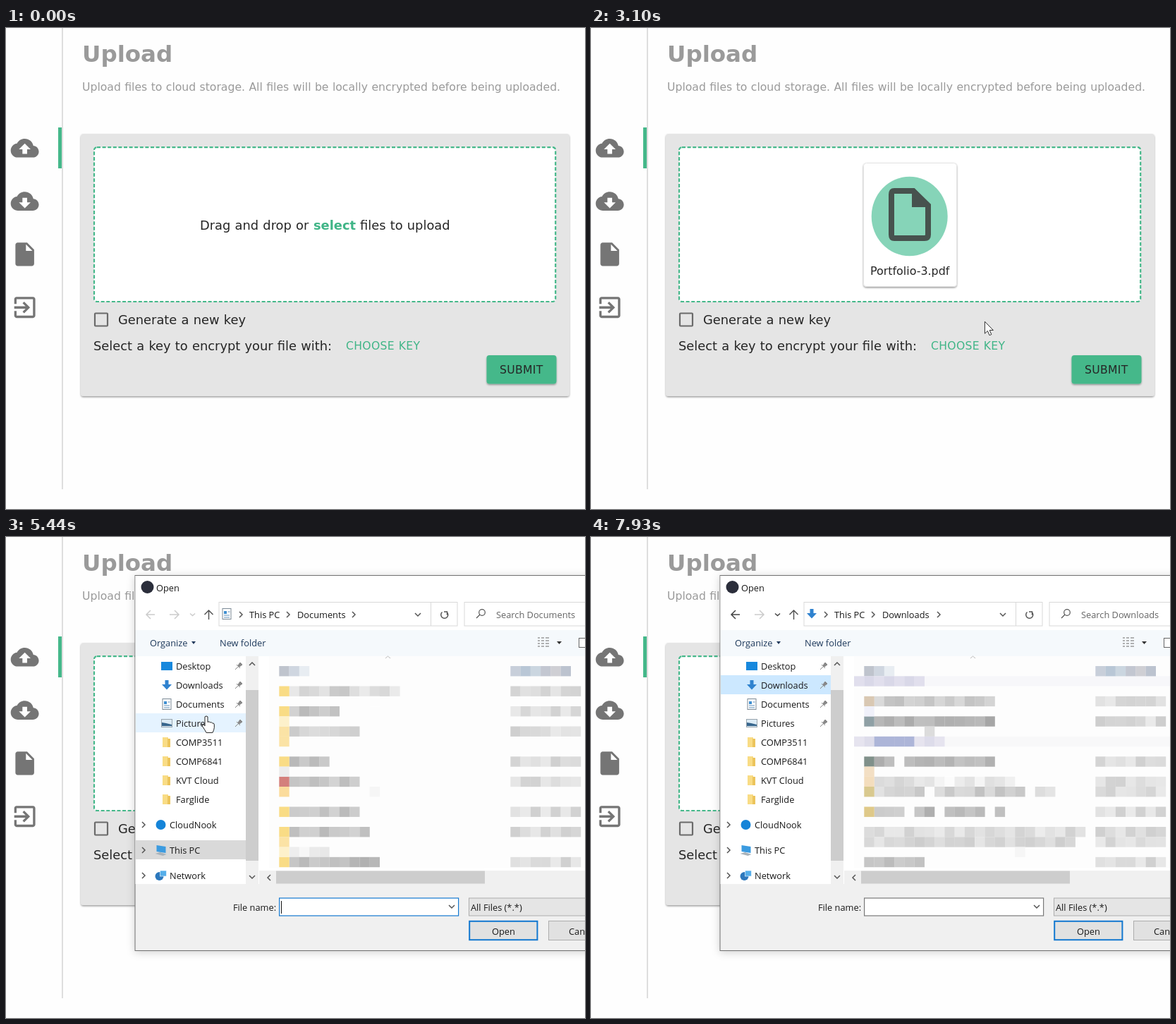
Write an HTML page that moves like this. It is 821 by 682 pixels and loops after 8 s.

```html
<!DOCTYPE html>
<html lang="en">
<head>
<meta charset="utf-8">
<title>Encrypted upload</title>
<style>
html, body { margin: 0; width: 100%; height: 100%; overflow: hidden; background: #fefefe; }
svg { display: block; }
text { white-space: pre; }
.page text { font-family: "DejaVu Sans", sans-serif; font-size: 17.85px; fill: #262626; word-spacing: .03em; }
.dialog text, .drag text { font-family: "Open Sans", sans-serif; font-size: 12.8px; fill: #1a1a1a; }
.page .muted { fill: #9a9a9a; }
.page .green { fill: #40b587; }
.page .button { font-size: 15.6px; letter-spacing: .35px; }
.dialog .soft { fill: #666; }
.dialog .tool { fill: #1e395b; }
.line { fill: none; stroke: #555; stroke-width: 1.5; }
</style>
</head>
<body>
<svg id="stage" width="821" height="682" viewBox="0 0 821 682"></svg>
<script>
const LOOP = 8000;
const GREEN = '#45b88a';
const CELL = 14.26;
const stage = document.getElementById('stage');

const text = (x, y, s, attrs = '') => `<text x="${x}" y="${y}" ${attrs}>${s}</text>`;
const rect = (x, y, w, h, fill, attrs = '') =>
  `<rect x="${x}" y="${y}" width="${w}" height="${h}" fill="${fill}" ${attrs}/>`;
const path = (d, attrs = 'class="line"') => `<path d="${d}" ${attrs}/>`;
const disc = (x, y, r, fill) => `<circle cx="${x}" cy="${y}" r="${r}" fill="${fill}"/>`;
const group = (id, body, attrs = '') => `<g id="${id}" ${attrs}>${body}</g>`;
const chevron = (x, y) => path(`M${x - 2} ${y - 4}l4 4-4 4`);
const downChevron = (x, y) => path(`M${x - 4} ${y - 2}l4 4 4-4`);
const noise = n => { const v = Math.sin(n * 127.1 + 31.7) * 43758.5453; return v - Math.floor(v); };

/* Page */
const CLOUD = 'M19.35 10.04C18.67 6.59 15.64 4 12 4 9.11 4 6.6 5.64 5.35 8.04 2.34 8.36 0 10.91 0 14c0 3.31 2.69 6 6 6h13c2.76 0 5-2.24 5-5 0-2.64-2.05-4.78-4.65-4.96z';
const navIcons = [
  CLOUD + 'M14 13v4h-4v-4H7l5-5 5 5h-3z',
  CLOUD + 'M17 13l-5 5-5-5h3V9h4v4h3z',
  'M6 2c-1.1 0-1.99.9-1.99 2L4 20c0 1.1.89 2 1.99 2H18c1.1 0 2-.9 2-2V8l-6-6H6zm7 7V3.5L18.5 9H13z',
  'M10.09 15.59L11.5 17l5-5-5-5-1.41 1.41L12.67 11H3v2h9.67l-2.58 2.59zM19 3H5c-1.11 0-2 .9-2 2v4h2V5h14v14H5v-4H3v4c0 1.1.89 2 2 2h14c1.1 0 2-.9 2-2V5c0-1.1-.9-2-2-2z'
].map((d, i) => path(d, `transform="translate(6.7 ${150.4 + i * 75.3}) scale(1.66)" fill="#757575" fill-rule="evenodd"`)).join('');

const fileCard =
  rect(386.5, 191.5, 132, 175, '#fff', 'rx="4" stroke="#e4e4e4" filter="url(#lift)"') +
  '<ellipse cx="451.7" cy="267" rx="54" ry="56.3" fill="#86d4b8"/>' +
  path('M430 231H457L478 252V293Q478 298 473 298H430Q426 298 426 293V236Q426 231 430 231Z', 'fill="none" stroke="#47524e" stroke-width="8"') +
  path('M455 228H459L482 250V254H455Z', 'fill="#47524e"') +
  text(396, 350, 'Portfolio-3.pdf', 'style="font-size:15.9px"');

const page =
  rect(79, 0, 2, 654, '#dedede') + rect(74, 141, 5, 58, GREEN) + navIcons +
  text(108, 48, 'Upload', 'class="muted" style="font-size:32.5px;font-weight:bold"') +
  text(108, 89, 'Upload files to cloud storage. All files will be locally encrypted before being uploaded.',
    'class="muted" style="font-size:15.65px"') +
  rect(106, 150, 693, 372, '#e5e5e5', 'rx="4" filter="url(#lift)"') +
  group('zone',
    rect(125, 169.2, 654.2, 218.8, '#fff', `rx="4" stroke="${GREEN}" stroke-width="2.2" stroke-dasharray="5 2.6"`) +
    group('prompt',
      text(275, 286, 'Drag and drop or') +
      text(436, 286, 'select', 'class="green" font-weight="bold"') +
      text(502, 286, 'files to upload'))) +
  group('card', fileCard) +
  rect(126, 404.5, 18, 18, 'none', 'rx="1" stroke="#6b6b6b" stroke-width="2.2"') +
  text(159, 420, 'Generate a new key') +
  text(124, 457, 'Select a key to encrypt your file with:') +
  rect(474, 437, 120, 27, GREEN, 'id="keyHover" rx="4"') +
  text(482, 456, 'CHOOSE KEY', 'class="green button"') +
  rect(681.5, 464, 99, 40.5, GREEN, 'rx="4" filter="url(#lift)"') +
  text(700, 490, 'SUBMIT', 'class="button"');

/* File dialog */
const downArrow = (x, y) => path(`M${x - 2.5} ${y - 7}h5v6h4.5l-7 7.5-7-7.5h4.5z`, 'fill="#2f82cf"');
const sheet = (x, y) => rect(x - 6, y - 7.5, 12, 15, '#fff', 'stroke="#7c8a96"') +
  rect(x - 4, y - 4, 4, 4, '#3f8fd0') +
  path(`M${x + 1.5} ${y - 3}h3M${x - 4} ${y + 2}h8M${x - 4} ${y + 5}h8`, 'stroke="#5f8fb8"');
const folder = (x, y) => rect(x - 6, y - 7, 8, 14, '#f9dc85') + rect(x + 1, y - 5, 4, 12, '#ecc45c');
const screen = (x, y) => rect(x - 8, y - 6, 16, 12, '#1788dd');
const picture = (x, y) => rect(x - 7.5, y - 5.5, 15, 11, '#dcebf5', 'stroke="#98a4ad"') +
  path(`M${x - 7} ${y + 4}v-5l6 1 8 2v2z`, 'fill="#36658c"');
const computer = (x, y) => path(`M${x - 6} ${y - 7}l13 2v9l-13-2z`, 'fill="#3b9be0"') +
  path(`M${x - 8} ${y + 5}l7-2 9 3-5 2z`, 'fill="#a9b2b9"');
const network = (x, y) => disc(x - 2, y + 1, 6, '#2c78bd') + rect(x - 1, y - 7, 9, 8, '#55aeea', 'stroke="#fff" stroke-width=".6"');
const pin = y => path(`M325 ${y + 5}l4-4M327 ${y - 2}l5 5M329 ${y - 1}l3-4 3 3-4 3z`, 'fill="#888" stroke="#888"');

const places = [['Desktop', screen], ['Downloads', downArrow], ['Documents', sheet], ['Pictures', picture],
  ['COMP3511', folder], ['COMP6841', folder], ['KVT Cloud', folder], ['Farglide', folder]]
  .map(([name, icon], i) => {
    const y = 183 + i * 27;
    return icon(228, y) + text(241, y + 4.6, name) + (i < 4 ? pin(y) : '');
  }).join('');
const roots = [['CloudNook', (x, y) => disc(x, y, 7, '#1584d8')], ['This PC', computer], ['Network', network]]
  .map(([name, icon], i) => {
    const y = 408 + i * 36;
    return chevron(195, y) + icon(219.5, y) + text(232, y + 4.6, name);
  }).join('');

const folderNames = ['Custom Letter Templates', 'Downloads', 'Luminous Forge', 'Thornwick', 'zibbit', 'Corvell Vaults',
  'PenLeaf Notebooks', 'ProgramThings', 'Sound recordings', 'Website', 'ConsoleScriptTool'];
const folderDates = ['14/04/2020 11:37 PM', '19/01/2020 10:57 AM', '15/02/2020 9:49 PM', '20/04/2021 11:21 AM',
  '23/05/2020 7:05 PM', '6/06/2021 1:06 PM', '15/02/2020 10:40 PM', '24/05/2021 10:31 AM',
  '12/04/2021 10:10 AM', '15/02/2020 9:49 PM', '27/04/2021 9:57 AM'];
const fileList = text(383.5, 189, 'Name', 'class="soft"') + text(714.7, 189, 'Date modified', 'class="soft"') +
  rect(380, 448, 441, 23, '#e5f3ff') +
  folderNames.map((name, i) => {
    const y = 219 + i * 24;
    return (i === 5 ? rect(385, y - 7, 14, 14, '#a3562d') : folder(391, y)) +
      text(405, y + 4.6, name) + text(714.7, y + 4.6, folderDates[i], 'class="soft"');
  }).join('');

const cell = (col, row, fill) =>
  rect((387.3 + col * CELL).toFixed(1), (183 + row * 14.25).toFixed(1), 14.4, 14.4, fill);

// Each row: line, first column, end column, grey level, icon colour. Rows with an icon also get a date.
function mosaic(rows) {
  const run = (line, from, to, level) => {
    let out = '';
    for (let col = from; col < to; col++) {
      const v = Math.round(level + (noise(col + line * 37) - .5) * 28);
      out += cell(col, line, `rgb(${v},${v},${v})`);
    }
    return out;
  };
  const header = ['#bfc4cd', '#cfd6e0', '#e8edf2'].map((c, i) => cell(i, 0, c)).join('') +
    ['#c8cfda', '#b9c7d6', '#cbd6e0', '#c3c7d1', '#cfcfd4', '#bcc3cf'].map((c, i) => cell(23 + i, 0, c)).join('');
  return rect(373, 169, 448, 300, '#fdfdfd') + header + rows.map(([line, from, to, level, icon]) =>
    run(line, from, to, level) + (icon ? cell(0, line, icon) + run(line, 23, 30, 220) : '')).join('');
}
const YELLOW = '#f9dc85', CREAM = '#fbe3a5', PALE = '#fdf1cb';
const documents = mosaic([[2, 1, 5, 220, YELLOW], [2, 5, 7, 200], [2, 7, 12, 230], [4, 1, 6, 198, YELLOW],
  [6, 1, 8, 214, CREAM], [9, 1, 5, 198, YELLOW], [11, 1, 8, 200, '#d4807c'], [14, 1, 8, 200, YELLOW],
  [16, 1, 9, 198, YELLOW], [18, 1, 5, 238], [19, 1, 10, 190, YELLOW],
  [3, 9, 10, 242], [12, 9, 10, 236], [10, 0, 1, 238]]) +
  cell(0, 5, PALE) + cell(0, 7, CREAM) + cell(0, 12, '#fbdc9c') + cell(0, 17, CREAM) + cell(0, 18, PALE);
const lavender = (line, from, to, strong) => Array.from({ length: to - from }, (_, i) =>
  cell(from + i, line, strong && i > 1 && i < 6 ? '#adb5d8' : i % 2 ? '#dddcea' : '#e6e4ef')).join('');
const downloads = mosaic([[3, 1, 13, 205, '#d9c8b3'], [5, 1, 13, 180, '#8fa0a5'], [6, 6, 7, 224],
  [9, 1, 3, 186, '#80908a'], [9, 4, 13, 186], [11, 1, 6, 222, '#f3ddbd'], [11, 6, 15, 238],
  [12, 1, 6, 212, '#d9c98f'], [12, 7, 16, 208], [12, 17, 19, 222],
  [14, 1, 4, 200, '#dfc989'], [14, 5, 7, 188], [14, 8, 12, 194], [14, 13, 14, 204],
  [16, 1, 22, 222, '#dcdcdc'], [17, 1, 21, 218, '#d8d8d8'], [18, 15, 16, 234], [19, 1, 6, 192, '#c6c6c6']]) +
  cell(0, 4, '#f0f1fa') + cell(0, 10, '#f3dfc4') +
  rect(373, 283, 448, 14.25, '#f8f8f9') + lavender(7, -1, 8, true) + lavender(1, -1, 6, false);

const navArrows = path('M211 110H199m6-6-6 6 6 6', 'id="back" class="line"') +
  path('M232 110h13m-6-6 6 6-6 6', 'class="line" style="stroke:#ccc"') +
  path('M261 108.500l3.500 3 3.500-3', 'id="recent" class="line"') +
  path('M287.500 117v-13m-6 6 6-6 6 6');
const detailLines = [143, 147, 151, 155].map(y => path(`M754 ${y}h3m2 0h4m2 0h5`, 'stroke="#999" stroke-width="1.5"')).join('');

const dialog =
  rect(183, 54.5, 668, 532, '#f0f0f0', 'stroke="#6f6f6f" filter="url(#window)"') +
  rect(183.5, 55, 667, 77, '#fff') + rect(183.5, 132, 667, 37, '#f5f9fc') + rect(183.5, 169, 667, 323, '#fff') +
  disc(200.5, 71, 9, '#2b2e3b') + text(213, 76.5, 'Open') + navArrows +
  rect(302, 92.5, 338, 33.5, '#fff', 'stroke="#d9d9d9"') + path('M602.500 93v33', 'stroke="#d9d9d9"') +
  group('docIcon', sheet(313, 109)) + group('downIcon', downArrow(313, 109)) +
  chevron(333, 110) + text(345, 114.5, 'This PC') + chevron(400, 110) +
  text(413, 114.5, 'Documents', 'id="crumb"') + group('lastCrumb', chevron(493, 110)) +
  downChevron(584, 110) + path('M618.500 106.500a5 5 0 1 0 6.500 0M625.500 110.500v-4.500h-4.500') +
  rect(650, 92.5, 190, 33.5, '#fff', 'stroke="#d9d9d9"') +
  path('M667 115l5-5', 'class="line" style="stroke-width:1.2"') +
  '<circle cx="675" cy="107" r="4.3" class="line" style="stroke-width:1.2"/>' +
  text(695, 114.5, 'Search Documents', 'id="search" class="soft"') +
  group('tools',
    text(204, 155, 'Organize', 'class="tool"') + path('M263 148h6l-3 4z', 'fill="#1e395b"') +
    text(303, 155, 'New folder', 'class="tool"') + detailLines +
    path('M781 148h7l-3.500 4z', 'fill="#333"') + rect(812.5, 143.5, 16, 13, '#fff', 'stroke="#666"')) +
  rect(184, 430, 156, 27, '#d9d9d9', 'id="rootSelected"') + rect(184, 223, 156, 27, '#cce8ff', 'id="selected"') +
  rect(184, 250, 156, 27, '#e5f3ff', 'id="rowHover"') + places + roots +
  rect(340, 169, 18, 323, '#f0f0f0') + rect(340, 217, 18, 242, '#cdcdcd') +
  path('M345 182l4-4 4 4M345 480l4 4 4-4') +
  group('files', fileList) + group('documents', documents) + group('downloads', downloads) +
  rect(373, 197.25, 448, 14.25, '#9090c8', 'id="lineHover" opacity=".05"') +
  rect(373, 183, CELL, 2 * CELL, '#777', 'id="blur" opacity=".12"') +
  path('M538 172l3.500-3 3.500 3', 'fill="none" stroke="#bbb"') +
  rect(359, 473, 480, 19, '#f0f0f0') + rect(383, 473.5, 296, 18, '#cdcdcd') + path('M375 479l-4 4 4 4') +
  text(322, 529.5, 'File name:') + rect(387.6, 512, 254, 25, '#fff', 'id="field" stroke-width="1.2"') +
  rect(390, 516, 1, 18, '#111', 'id="caret"') + downChevron(632, 524) +
  rect(656.5, 512, 184, 25, '#e5e5e5', 'stroke="#adadad"') + text(659, 529.5, 'All Files (*.*)') +
  rect(657.2, 544.8, 96.2, 26.4, '#e1e1e1', 'stroke="#1378d0" stroke-width="2"') + text(689, 563.5, 'Open') +
  rect(769.5, 544.5, 72, 27, '#e1e1e1', 'stroke="#adadad"') + text(798, 563.5, 'Cancel');

/* Pointer, drawn with its tip at 0,0 */
const dragged =
  rect(-57, -103, 117, 118, '#e4f3fc', 'opacity=".82" filter="url(#lift)"') +
  rect(-38, -94, 82, 100, '#f4f4f6', 'rx="9" stroke="#ee4a40" stroke-width="3.5" opacity=".95"') +
  disc(2, -53, 20, '#ee4a40') +
  text(-16, -8, 'PDF', 'style="font-size:19px;font-weight:600;fill:#50565c"') +
  rect(13.5, 16, 61, 23, '#fff', 'stroke="#777"') +
  text(18, 32, '+ Copy', 'style="fill:#1d4f91"');
const pointer = group('drag', dragged, 'class="drag"') + '<circle id="press" r="13.5" fill="#f4e51f" opacity=".8"/>' +
  path('M0 0V17L4 13.300 6.600 19.500 9.400 18.300 6.800 12.300H12Z', 'id="arrow" fill="#fff" stroke="#333"') +
  path('M-2 .5Q0-1.500 2 .5V8Q4 6.500 5.500 8.500 7.500 7.500 8.700 9.700 11 9 11.300 11.500V16Q11 19 9 23H0Q-2 19-5.500 14-6.500 11-3.800 11.500L-2 13.500Z',
    'id="hand" fill="#fff" stroke="#222"');

stage.innerHTML = `<defs>
  <filter id="lift" x="-20%" y="-20%" width="140%" height="150%"><feDropShadow dx="0" dy="1.5" stdDeviation="1.2" flood-opacity=".38"/></filter>
  <filter id="window" x="-10%" y="-10%" width="120%" height="120%"><feDropShadow dx="0" dy="2" stdDeviation="6" flood-opacity=".18"/></filter>
</defs>` + group('page', page, 'class="page"') + group('dialog', dialog, 'class="dialog"') + group('pointer', pointer);

const el = Object.fromEntries([...stage.querySelectorAll('[id]')].map(node => [node.id, node]));
const show = (id, on) => { el[id].style.display = on ? '' : 'none'; };
const set = (id, attrs) => { for (const key in attrs) el[id].setAttribute(key, attrs[key]); };
const within = (t, from, to) => t >= from && t < to;

const route = [[2000, 805, 351], [2390, 716, 356], [2900, 716, 356], [3100, 559, 416], [3230, 486, 447],
  [3490, 539, 447], [4700, 539, 447], [5360, 310, 268], [5440, 284, 254.5], [5520, 283, 246], [5750, 283.5, 240.5],
  [6100, 283.5, 240.5], [6600, 273.5, 213], [7060, 273.5, 213], [7460, 480, 204], [8000, 480, 204]];
function pointerAt(t) {
  if (t < 2000) return [799, 677];
  const i = route.findIndex(stop => stop[0] > t);
  const [t0, x0, y0] = route[i - 1], [t1, x1, y1] = route[i];
  const p = (t - t0) / (t1 - t0);
  return [x0 + (x1 - x0) * p, y0 + (y1 - y0) * p];
}

function render(t) {
  const [x, y] = pointerAt(t);
  const dragging = within(t, 2000, 2640);
  const step = Math.min(2, Math.floor((t - 4330) / 85));
  const open = step < 0 ? 0 : [.27, .85, 1][step];
  const blurred = step > 0;
  const inSidebar = blurred && x < 340;
  const inList = blurred && x >= 373 && y < 469;
  const clickedDocs = t >= 6140, inDownloads = t >= 7140;

  set('zone', { opacity: within(t, 2090, 2640) ? .75 : 1 });
  show('prompt', t < 2640);
  show('card', t >= 2640);
  set('keyHover', { opacity: t < 3400 ? 0 : t < 3960 ? .04 : .15 });

  show('dialog', open > 0);
  set('dialog', { opacity: open, transform: `translate(517 320) scale(${.953 + .047 * open}) translate(-517 -320)` });
  show('tools', blurred);
  show('files', !blurred);
  show('documents', blurred && !inDownloads);
  show('downloads', inDownloads);
  show('docIcon', !inDownloads);
  show('downIcon', inDownloads);
  show('lastCrumb', !inDownloads || t >= 7630);
  el.crumb.textContent = inDownloads ? 'Downloads' : 'Documents';
  el.search.textContent = inDownloads ? 'Search Downloads' : 'Search Documents';
  el.back.style.stroke = el.recent.style.stroke = clickedDocs ? '#444' : '#ccc';
  show('rootSelected', !clickedDocs);
  show('selected', clickedDocs);
  set('selected', { y: t < 7060 ? 223 : 196 });
  const row = Math.floor((y - 169) / 27);
  show('rowHover', inSidebar && row < 8 && !(t >= 7060 && row === 1));
  set('rowHover', { y: 169 + row * 27 });
  set('field', { stroke: clickedDocs ? '#7a7a7a' : '#1378d0' });
  show('caret', within(t, 4330, 4780) || within(t, 5310, 5900));
  show('lineHover', t >= 7930);
  show('blur', inList && t < 7460);
  set('blur', { x: 387.3 + Math.floor((x - 387.3) / CELL) * CELL, y: 183 + Math.floor((y - 183) / 14.25) * 14.25 });

  show('pointer', within(t, 300, 380) || (t >= 2000 && !inList));
  set('pointer', { transform: `translate(${x.toFixed(1)} ${y.toFixed(1)})` });
  show('drag', dragging);
  show('press', dragging || within(t, 3960, 4100) || within(t, 5900, 6000) || within(t, 6830, 7060));
  show('arrow', !inSidebar);
  show('hand', inSidebar);
}

const start = performance.now();
function tick() {
  render((performance.now() - start) % LOOP);
  requestAnimationFrame(tick);
}
tick();
</script>
</body>
</html>
```
